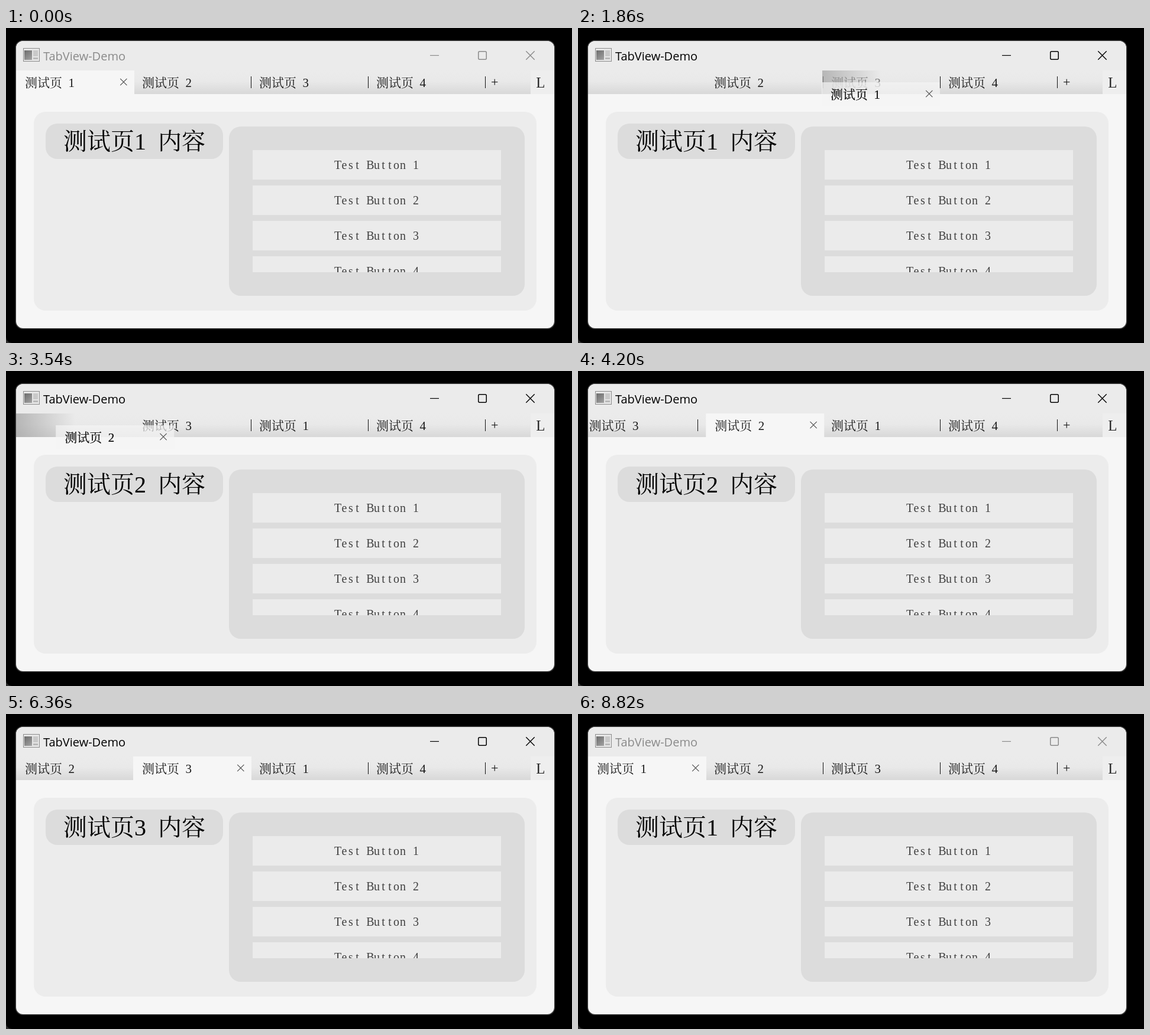
Recreate the animation shown at these times as an HTML page with a canvas. Size 957 by 534 pixels, loop 8.88 s.

```html
<!DOCTYPE html>
<html lang="zh">
<head>
<meta charset="utf-8">
<title>TabView-Demo</title>
<style>
html, body { margin: 0; width: 100%; height: 100%; overflow: hidden; background: #000; }
canvas { display: block; }
</style>
</head>
<body>
<canvas id="stage" width="957" height="534"></canvas>
<script>
const ctx = document.getElementById('stage').getContext('2d');
const LOOP = 8880, TICK = 60;
const LEFT = 17, TOP = 72, PITCH = 198, TAB_W = 200, TAB_H = 40;
const CJK = '"Noto Serif CJK SC", "Noto Sans CJK SC", "Noto Sans CJK", sans-serif';
const SERIF = '"Liberation Serif", serif';

// Each move: pointer hovers, picks the tab, drags it to x, then drops it into a slot.
const moves = [
  { tab: 1, hover: 0, pick: 0, drag: 1200, steps: 12, x: 412, slot: 2, drop: 2220, lead: 0.126 },
  { tab: 2, hover: 3000, pick: 3240, drag: 3480, steps: 7, x: 196, slot: 1, drop: 4080, lead: 0.126 },
  { tab: 3, hover: 4980, pick: 5340, drag: 5400, steps: 8, x: 230, slot: 1, drop: 6000, lead: 0.126 },
  { tab: 1, hover: 6720, pick: 7020, drag: 7080, steps: 10, x: 24, slot: 0, drop: 7800, lead: 0 }
];

const slotX = i => LEFT + i * PITCH;
const mix = (a, b, k) => a + (b - a) * k;

function outBack(p) {
  const u = Math.min(p, 1) - 1, s = 1.70158;
  return 1 + (s + 1) * u ** 3 + s * u * u;
}

function stateAt(t) {
  let order = [1, 2, 3, 4], active = 1, hover = 0, ghost = null;
  const pos = {};
  order.forEach((tab, i) => pos[tab] = slotX(i));
  for (const m of moves) {
    if (t < m.hover) break;
    hover = m.tab;
    if (t < m.pick) break;
    active = m.tab;
    if (t < m.drag) break;
    if (t < m.drop) {
      const q = Math.min(1, ((t - m.drag) / TICK + 1) / m.steps);
      const x = mix(pos[m.tab], m.x, 1 - (1 - q) ** 1.4);
      const slot = Math.round((x - LEFT) / PITCH);
      ghost = { x, y: TOP + 20 * Math.min(1, (t - m.drag + TICK) / 120), slot, over: order[slot] };
      break;
    }
    pos[m.tab] = m.x;
    order = order.filter(tab => tab !== m.tab);
    order.splice(m.slot, 0, m.tab);
    const k = outBack(m.lead + (t - m.drop) * 1.1 / 400);
    order.forEach((tab, i) => pos[tab] = mix(pos[tab], slotX(i), k));
    hover = 0;
  }
  return { order, active, hover, ghost, pos };
}

function rect(x, y, w, h, color) {
  ctx.fillStyle = color;
  ctx.fillRect(x, y, w, h);
}

function round(x, y, w, h, r, color) {
  ctx.fillStyle = color;
  ctx.beginPath();
  ctx.roundRect(x, y, w, h, r);
  ctx.fill();
}

function line(color, width, ...segments) {
  ctx.strokeStyle = color;
  ctx.lineWidth = width;
  ctx.beginPath();
  for (const [x1, y1, x2, y2] of segments) {
    ctx.moveTo(x1, y1);
    ctx.lineTo(x2, y2);
  }
  ctx.stroke();
}

function cross(cx, cy, r, color, width) {
  line(color, width, [cx - r, cy - r, cx + r, cy + r], [cx - r, cy + r, cx + r, cy - r]);
}

function fade(x0, y0, x1, y1, ...stops) {
  const g = ctx.createLinearGradient(x0, y0, x1, y1);
  stops.forEach(([at, color]) => g.addColorStop(at, color));
  return g;
}

// Full-width and half-width cells, as in a monospaced CJK face.
function cells(text, x, base, size, color, latin = size) {
  ctx.fillStyle = color;
  ctx.textAlign = 'center';
  for (const ch of text) {
    const wide = ch > '\u2e80', w = wide ? size : size / 2;
    ctx.font = wide ? `300 ${size}px ${CJK}` : `${latin}px ${SERIF}`;
    ctx.fillText(ch, x + w / 2, base);
    x += w;
  }
}

function clipped(x, y, w, h, draw) {
  ctx.save();
  ctx.beginPath();
  ctx.rect(x, y, w, h);
  ctx.clip();
  draw();
  ctx.restore();
}

function frameWindow() {
  rect(0, 0, 957, 534, '#000');
  rect(0, 524, 10, 10, '#2c2c2c');
  round(0, 500, 60, 34, 10, '#000');
  round(15.5, 20.5, 913, 490, 13, '#343434');
  round(17, 22, 910, 487, 12, '#f6f6f6');
  round(17, 22, 910, 50, [12, 12, 0, 0], '#ebebeb');
}

function titleBar(focused) {
  const ink = focused ? '#000' : '#8a8a8a';
  rect(29, 34, 28, 23, '#8d8d8d');
  rect(30, 35, 26, 21, '#e6e6e6');
  rect(31, 38, 13, 16, fade(31, 38, 44, 54, [0, '#6d6d6d'], [1, '#a2a2a2']));
  rect(46, 38, 8, 10, '#c9c9c9');
  rect(46, 50, 8, 3, '#b8b8b8');
  ctx.font = '20px "Open Sans", "Noto Sans", sans-serif';
  ctx.textAlign = 'left';
  ctx.fillStyle = ink;
  ctx.fillText('TabView-Demo', 63, 55);
  line(ink, 1.2, [717, 46.5, 732, 46.5]);
  ctx.lineWidth = 1.5;
  ctx.beginPath();
  ctx.roundRect(798.75, 39.75, 13.5, 13.5, 2);
  ctx.stroke();
  cross(886.5, 46.5, 7.2, ink, 1.4);
}

function tabFace(tab, x, y, alpha = 1) {
  ctx.globalAlpha = alpha;
  cells('测试页 ' + tab, x + 15, y + 28, 21, '#1a1a1a');
  ctx.globalAlpha = 1;
}

function closeMark(x, y) {
  cross(x + 181.8, y + 19.5, 5.6, '#505050', 1.2);
}

function activeTab(tab, x, y, alpha) {
  ctx.globalAlpha = alpha;
  rect(x, y, TAB_W, TAB_H, '#f6f6f6');
  tabFace(tab, x, y);
  closeMark(x, y);
}

function tabStrip(s) {
  rect(887, TOP, 40, TAB_H, '#eeeeee');
  cells('L', 901, 101, 12, '#2a2a2a', 25);
  rect(LEFT, TOP, 870, TAB_H,
    fade(0, TOP, 0, TOP + TAB_H, [0, '#ebebeb'], [0.45, '#e9e9e9'], [1, '#d8d8d8']));
  cells('+', 823.5, 98.5, 11, '#111', 22);

  clipped(LEFT, TOP, 870, 70, () => {
    for (const tab of s.order) {
      if (tab === s.active) continue;
      const x = s.pos[tab];
      tabFace(tab, x, TOP, s.ghost && s.ghost.over === tab ? 0.55 : 1);
      rect(Math.round(x) + 199, 82, 1, 20, '#111');
      if (tab === s.hover) closeMark(x, TOP);
    }
    if (s.ghost) {
      const x = slotX(s.ghost.slot);
      rect(x, TOP, 100, TAB_H,
        fade(x, 0, x + 100, 0, [0, 'rgba(160,160,160,.7)'], [1, 'rgba(160,160,160,0)']));
      activeTab(s.active, s.ghost.x, s.ghost.y, 0.7);
      tabFace(s.active, s.ghost.x, s.ghost.y);
    } else {
      activeTab(s.active, s.pos[s.active], TOP, 1);
    }
  });
}

function page(tab) {
  round(47, 142, 850, 337, 20, '#ececec');
  round(67, 162, 300, 60, 20, '#dcdcdc');
  cells(`测试页${tab} 内容`, 97, 206, 40, '#000');
  round(377, 167, 500, 287, 20, '#dcdcdc');
  clipped(417, 207, 420, 207, () => {
    for (let i = 0; i < 4; i++) {
      const y = 207 + i * 60;
      rect(417, y, 420, 50, '#ebebeb');
      cells('Test Button ' + (i + 1), 555.5, y + 32, 22, '#404040', 20);
    }
  });
}

function render() {
  const now = performance.now() % LOOP;
  const t = Math.floor(now / TICK) * TICK;
  const s = stateAt(t);
  frameWindow();
  titleBar(t >= 960 && t < 8820);
  page(s.active);
  tabStrip(s);
  requestAnimationFrame(render);
}
render();
</script>
</body>
</html>
```
